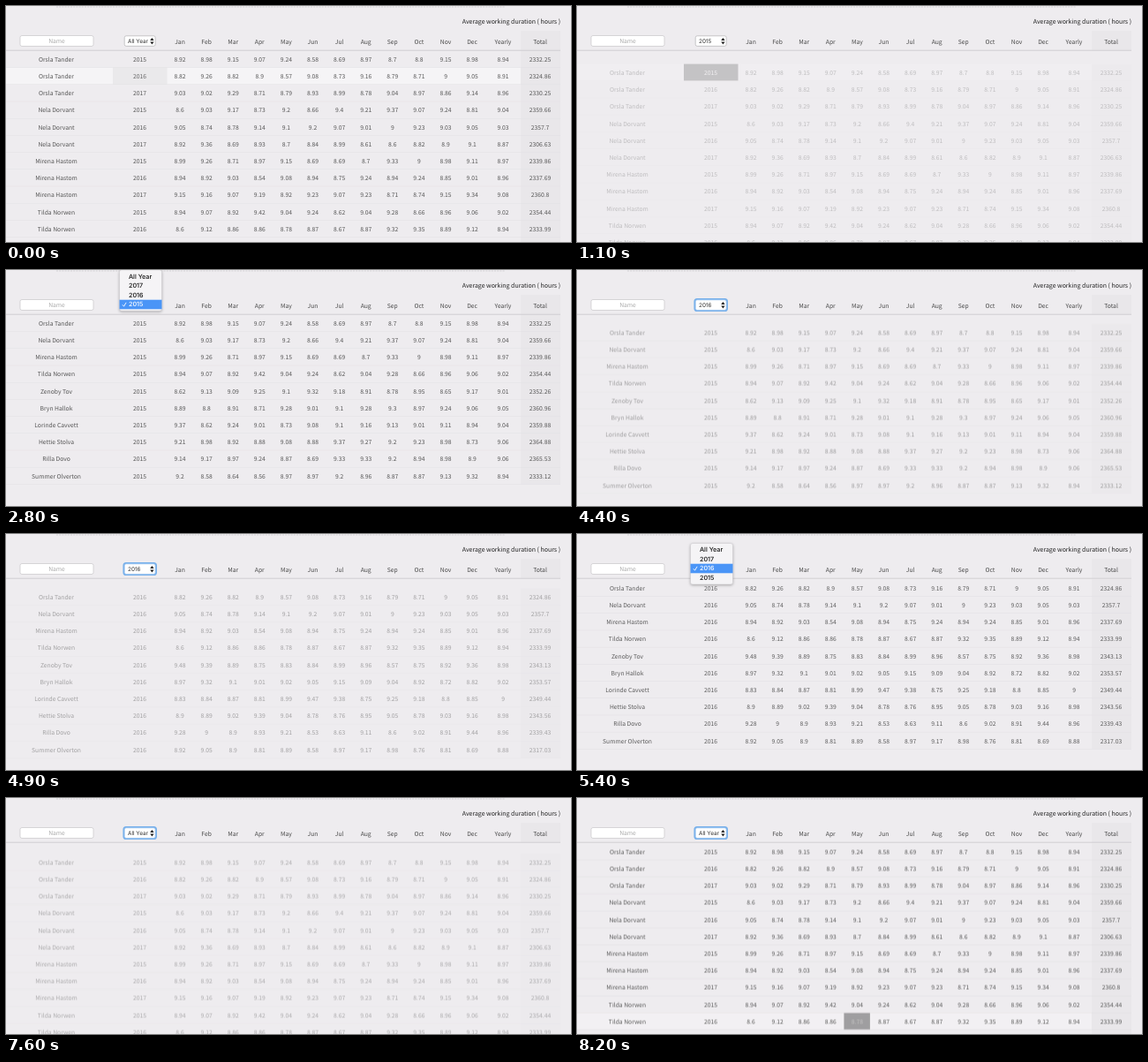
An HTML page for the animation above (8300 ms loop, 640x267 px).

```html
<!DOCTYPE html>
<html lang="en">
<head>
<meta charset="utf-8">
<title>Working hours table</title>
<style>
  html, body { margin: 0; width: 100%; height: 100%; overflow: hidden; background: #eeecef; }
  svg { display: block; }
  text {
    font: 300 6.75px "Noto Sans CJK SC", "Noto Sans CJK JP", "Noto Sans CJK", "Noto Sans", sans-serif;
    fill: #555; text-anchor: middle; text-rendering: geometricPrecision;
  }
  text.head { font-weight: 400; fill: #484848; }
  text.title { font-weight: 400; font-size: 6.97px; fill: #222; text-anchor: end; }
  text.ui { font: 400 6.4px Inter, Roboto, sans-serif; fill: #333; text-anchor: start; }
  text.item { font-size: 7.2px; font-weight: 500; }
</style>
</head>
<body>
<svg id="stage" width="640" height="267" viewBox="0 0 640 267"></svg>
<script>
const LOOP = 8300, ROW = 19.2, TOP = 50.4, DRIFT = 22;
const YEARS = ['2015', '2016', '2017'];
const OPTIONS = ['All Year', '2017', '2016', '2015'];
const MONTHS = 'Jan Feb Mar Apr May Jun Jul Aug Sep Oct Nov Dec'.split(' ');
const COLUMNS = [57, 151.5, ...MONTHS.map((_, i) => 197 + 30.1 * i), 563, 605];
const PEOPLE = ['Orsla Tander', 'Nela Dorvant', 'Mirena Hastom', 'Tilda Norwen', 'Zenoby Tov',
  'Bryn Hallok', 'Lorinde Cavvett', 'Hettie Stolva', 'Rilla Dovo', 'Summer Olverton'];

const stage = document.getElementById('stage');

function add(parent, tag, attrs, content = '') {
  const node = document.createElementNS('http://www.w3.org/2000/svg', tag);
  for (const key in attrs) node.setAttribute(key, attrs[key]);
  node.textContent = content;
  parent.append(node);
  return node;
}
const rect = (parent, x, y, width, height, fill, more) =>
  add(parent, 'rect', { x, y, width, height, fill, ...more });
const label = (parent, x, middle, content, cls = '') =>
  add(parent, 'text', { x, y: middle + 2.4, class: cls }, content);
const ramp = (t, from, to) => Math.min(1, Math.max(0, (t - from) / (to - from)));
const round = value => Math.round(value * 100) / 100;

// Seeded generator (mulberry32)
function seeded(seed) {
  return () => {
    seed = seed + 0x6D2B79F5 | 0;
    let n = Math.imul(seed ^ seed >>> 15, seed | 1);
    n ^= n + Math.imul(n ^ n >>> 7, n | 61);
    return ((n ^ n >>> 14) >>> 0) / 4294967296;
  };
}

// Monthly averages near nine hours; the total covers the working days of the year.
const random = seeded(2015);
const records = PEOPLE.flatMap(name => YEARS.map(year => {
  const months = MONTHS.map(() => round(9 + 0.5 * (random() + random() - 1)));
  const mean = months.reduce((sum, hours) => sum + hours) / 12;
  return [name, year, ...months, round(mean), round(mean * (year === '2017' ? 260 : 261))];
}));

function buildTable(year) {
  const group = add(stage, 'g');
  const rows = records.filter(record => !year || record[1] === year).slice(0, 12);
  const back = add(group, 'g');
  rect(back, 583, TOP, 45, rows.length * ROW, '#e9e7ea');
  const cells = rows.map((row, i) => {
    const y = TOP + ROW * (i + 1);
    rect(group, 0, y - 0.25, 628, 0.5, '#e1dfe2');
    return row.map((value, c) => label(group, COLUMNS[c], y - ROW / 2 + 0.4, value));
  });
  return { group, back, cells };
}

// Returns a setter for the cell tint and its row strip.
function hoverCell(table, row, column) {
  const y = TOP + row * ROW, wide = column === 1;
  const strip = rect(table.back, 0, y, 583, ROW, '#f5f4f6');
  const tint = rect(table.back, COLUMNS[column] - (wide ? 30.5 : 15), y, wide ? 61.5 : 29.5, ROW, '#6a6a6a');
  const text = table.cells[row][column];
  return (alpha, stripAlpha) => {
    strip.setAttribute('opacity', stripAlpha);
    tint.setAttribute('opacity', alpha);
    const shade = 85 + 170 * alpha;
    text.style.fill = `rgb(${shade},${shade},${shade})`;
  };
}

// Header
add(stage, 'path', { d: 'M57 1H565', stroke: '#cbc9cc', 'stroke-width': 0.8, 'stroke-dasharray': '2 1.2' });
rect(stage, 583, 28, 45, TOP - 28, '#e9e7ea');
label(stage, 628, 18, 'Average working duration ( hours )', 'title');
[...MONTHS, 'Yearly', 'Total'].forEach((name, i) => label(stage, COLUMNS[i + 2], 40.7, name, 'head'));

const all = buildTable(), y2015 = buildTable('2015'), y2016 = buildTable('2016');
const tables = [all, y2015, y2016];
rect(stage, 0, 49.8, 628, 0.7, '#c4c2c5');

rect(stage, 16, 33.5, 83, 12, '#fff', { rx: 2, stroke: '#c8c6c9', 'stroke-width': 0.7 });
label(stage, 57.5, 39.6, 'Name').style.fill = '#aaa';

// Select box
const ring = rect(stage, 133.6, 33.3, 36.2, 12.6, 'none', { rx: 2.5, stroke: '#78b0ea', 'stroke-width': 2.4 });
const box = rect(stage, 134.2, 33.8, 35, 11.6, '#fff', { rx: 2, stroke: '#b2b0b3', 'stroke-width': 0.7 });
const selected = label(stage, 138, 39.4, '', 'ui');
add(stage, 'path', { d: 'M163.2 38.9L165.4 36L167.6 38.9ZM163.2 40.5L165.4 43.4L167.6 40.5Z', fill: '#222' });

// Popup menu, placed so that its checked option covers the select box
function buildPopup(checked) {
  const pitch = 10.6, first = 39 - checked * pitch;
  const group = add(stage, 'g');
  const frame = { rx: 2.5, stroke: '#c9c7ca', 'stroke-width': 0.5,
    style: 'filter:drop-shadow(0 1.2px 1.6px rgba(0,0,0,.28))' };
  rect(group, 128.5, first - 7.3, 48, pitch * 3 + 14.6, '#f5f4f6', frame);
  const bar = rect(group, 128.5, 0, 48, pitch, '#4a95f7');
  const items = OPTIONS.map((name, i) => label(group, 139, first + i * pitch - 0.1, name, 'ui item'));
  const y = first + checked * pitch;
  const tick = add(group, 'path', { d: `M132 ${y + 0.3}l1.5 1.9l2.6 -4.4`, fill: 'none', 'stroke-width': 0.9 });
  return (alpha, active) => {
    group.setAttribute('opacity', alpha);
    bar.setAttribute('y', first + active * pitch - pitch / 2);
    items.forEach((item, i) => item.style.fill = i === active ? '#fff' : '#111');
    tick.setAttribute('stroke', active === checked ? '#fff' : '#111');
  };
}
const popup2015 = buildPopup(3), popup2016 = buildPopup(2);

const hoverFirst = hoverCell(all, 0, 1), hoverSecond = hoverCell(all, 1, 1);
const hoverNew = hoverCell(y2015, 0, 1), hoverMay = hoverCell(all, 10, 6);

const switches = [[825, all, y2015], [4210, y2015, y2016], [6955, y2016, all]];

function render(t) {
  // Old rows sink and fade linearly, new rows rise with an ease-out.
  let shown = all, away = 0;
  for (const [start, before, after] of switches) {
    const e = t - start;
    if (e < 0) continue;
    shown = e < 400 ? before : after;
    away = e < 400 ? e / 400 : (1 - ramp(e, 400, 1400)) ** 2;
  }
  for (const table of tables) {
    table.group.setAttribute('visibility', table === shown ? 'visible' : 'hidden');
  }
  shown.group.setAttribute('opacity', 1 - away);
  shown.group.setAttribute('transform', `translate(0 ${DRIFT * away})`);

  const early = t < 4000;
  hoverSecond(0.08 * (1 - ramp(t, 0, 180)), 1 - ramp(t, 80, 200));
  hoverFirst(early ? ramp(t, 80, 400) : 0, early ? ramp(t, 80, 200) : 0);
  const leaving = 1 - ramp(t, 2100, 2420);
  hoverNew(leaving, leaving);
  const may = ramp(t, 8040, 8300);
  hoverMay(may, may);

  selected.textContent = t < 800 || t >= 6850 ? 'All Year' : t < 4250 ? '2015' : '2016';
  ring.setAttribute('opacity', t >= 4250 ? 1 : 0);
  box.setAttribute('stroke', t >= 4250 ? '#8fbcec' : '#b2b0b3');
  popup2015(t < 2780 ? 0 : 1 - ramp(t, 3600, 3980), t < 3200 ? 3 : 2);
  popup2016(t < 5280 ? 0 : 1 - ramp(t, 6520, 6850), t < 6080 ? 2 : t < 6280 ? 1 : 0);
}

function tick() {
  render(performance.now() % LOOP);
  requestAnimationFrame(tick);
}
tick();
</script>
</body>
</html>
```
